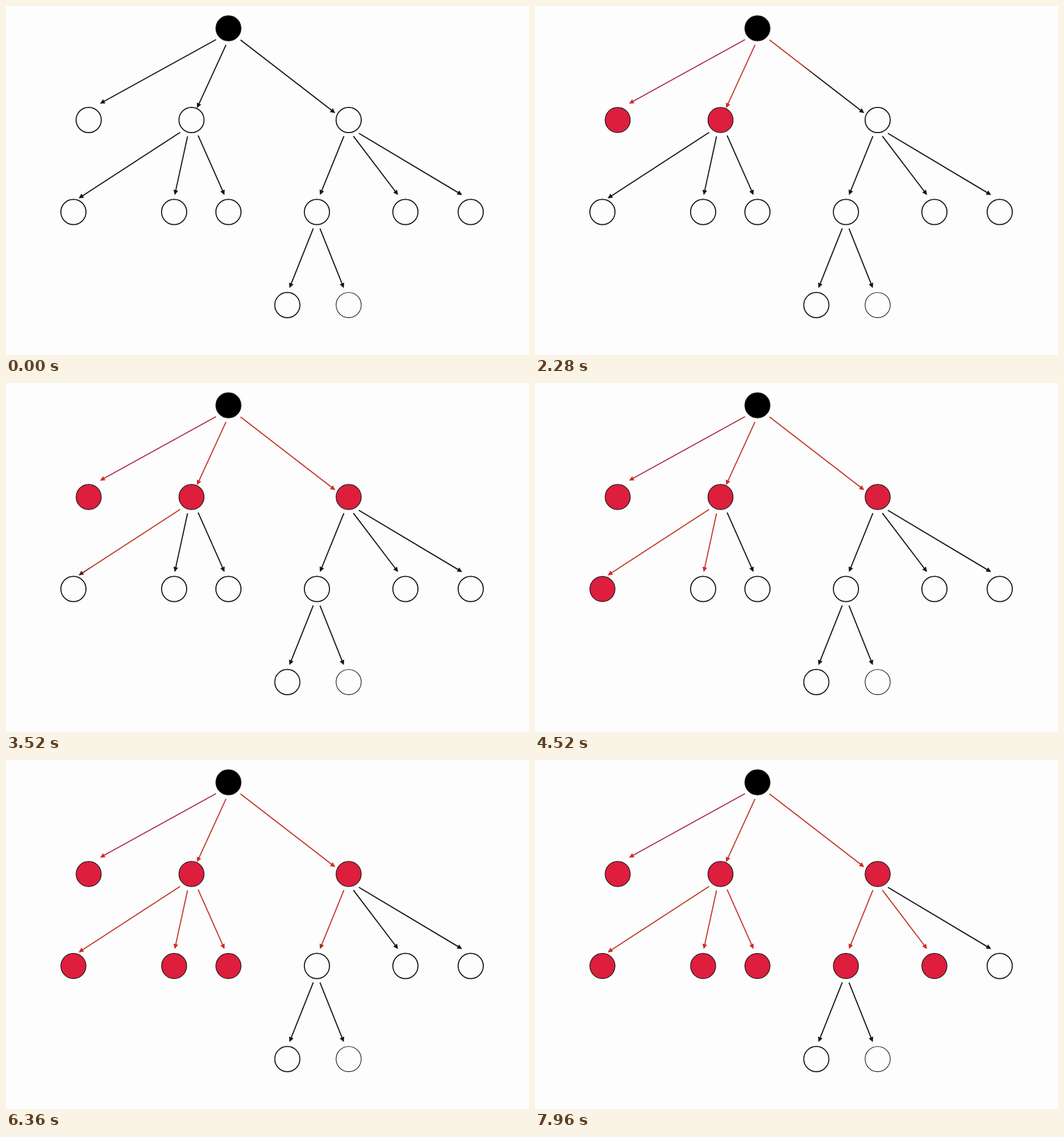
An HTML page with a canvas that plays this animation: 857x571 px, repeating every 8 s.

```html
<!DOCTYPE html>
<html lang="en">
<head>
<meta charset="utf-8">
<title>Tree traversal</title>
<style>
  html, body { margin: 0; width: 100%; height: 100%; overflow: hidden; background: #fdfdfd; }
  canvas { display: block; }
</style>
</head>
<body>
<canvas id="stage" width="857" height="571"></canvas>
<script>
const ctx = document.getElementById('stage').getContext('2d');
const LOOP = 8000, WIPE = 400, FADE_DELAY = 440, FADE = 160, SOFT = 0.18;
const INK = '#161616', RED = '#dd1e3d', BRICK = '#c23a2b', CRIMSON = '#b02d48';
const ROWS = [36.5, 186.5, 337, 489.3];
const RADIUS = 20.6, CLEAR = 27.5;

// Moments at which the walk takes its next step, in breadth-first order
const steps = [200, 1120, 2110, 3170, 4080, 5090, 5990, 7230];

// out: x offset where the arrow leaves the parent; tip: x offset where it ends
const tree = { x: 364.5, kids: [
  { x: 135.5, out: -20.4, tip: 18.5, gap: 26.8, color: CRIMSON },
  { x: 304, out: -4, tip: 9, gap: 19.5, kids: [
    { x: 110.5, out: -18.6, tip: 8.5, gap: 22.3 },
    { x: 275.5, out: -6.5, tip: 1 },
    { x: 364.5, out: 10.8, tip: -6.5 }
  ] },
  { x: 561.5, out: 19.8, tip: -22, gap: 11.3, kids: [
    { x: 509.5, out: -7.8, tip: 5, kids: [
      { x: 461, out: -6, tip: 3.5 },
      { x: 561.5, out: 5, tip: -8, stroke: 1.1 }
    ] },
    { x: 654.5, out: 7.7, tip: -12 },
    { x: 761.5, out: 16.7, tip: -14 }
  ] }
] };

// Breadth-first list; children queue up behind their parent
const nodes = [{ ...tree, row: 0 }];
for (const parent of nodes) {
  for (const kid of parent.kids || []) nodes.push({ ...kid, parent, row: parent.row + 1 });
}
const [root, ...children] = nodes;

const clamp = v => Math.max(0, Math.min(1, v));

function wipePaint(p, color, len) {
  if (p <= 0) return INK;
  if (p >= 1) return color;
  const front = p * (1 + SOFT);
  const g = ctx.createLinearGradient((front - SOFT) * len, 0, front * len, 0);
  g.addColorStop(0, color);
  g.addColorStop(1, INK);
  return g;
}

function arrow({ x, row, parent, out, tip, gap = 27.8, color = BRICK }, p) {
  const x1 = parent.x + out, y1 = ROWS[parent.row] + Math.sqrt(CLEAR ** 2 - out ** 2);
  const dx = x + tip - x1, dy = ROWS[row] - gap - y1;
  const len = Math.hypot(dx, dy);
  ctx.save();
  ctx.translate(x1, y1);
  ctx.rotate(Math.atan2(dy, dx));
  ctx.strokeStyle = ctx.fillStyle = wipePaint(p, color, len);
  ctx.lineWidth = 1.8;
  ctx.beginPath();
  ctx.moveTo(0, 0);
  ctx.lineTo(len - 6, 0);
  ctx.stroke();
  if (p >= 1) ctx.fillStyle = '#d02c28';
  ctx.beginPath();
  ctx.moveTo(len, 0);
  ctx.lineTo(len - 8, -3.9);
  ctx.lineTo(len - 8, 3.9);
  ctx.fill();
  ctx.restore();
}

function disc({ x, row, stroke = 1.7 }, fill, alpha) {
  ctx.beginPath();
  ctx.arc(x, ROWS[row], RADIUS, 0, 2 * Math.PI);
  ctx.globalAlpha = alpha;
  ctx.fillStyle = fill;
  ctx.fill();
  ctx.globalAlpha = 1;
  ctx.strokeStyle = INK;
  ctx.lineWidth = stroke - 0.5 * alpha;
  ctx.stroke();
}

function draw(t) {
  ctx.fillStyle = '#fdfdfd';
  ctx.fillRect(0, 0, 857, 571);
  disc(root, '#000', 1);
  children.forEach((node, i) => {
    const age = i in steps ? t - steps[i] : 0;
    disc(node, RED, clamp((age - FADE_DELAY) / FADE));
    arrow(node, clamp(age / WIPE));
  });
}

function tick() {
  draw(performance.now() % LOOP);
  requestAnimationFrame(tick);
}
tick();
</script>
</body>
</html>
```
